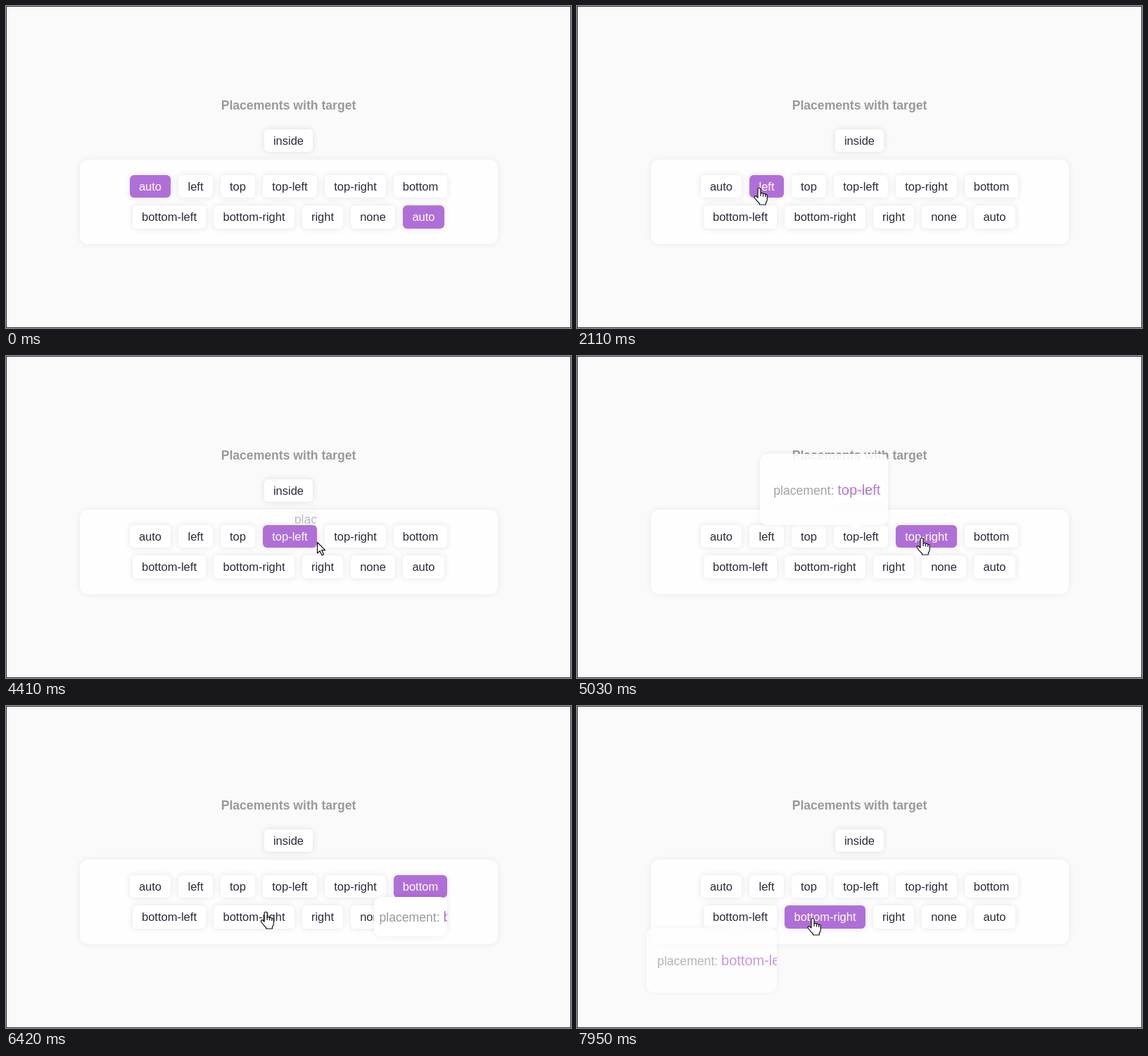
Recreate the animation shown at these times as an HTML page. Size 803x457 px, loop 8 s.

```html
<!DOCTYPE html>
<html lang="en">
<head>
<meta charset="utf-8">
<title>Placements</title>
<style>
  html, body { margin: 0; width: 100%; height: 100%; overflow: hidden; background: #fafafa; }
  body { position: relative; font-family: "Liberation Sans", Arial, sans-serif; }
  body > *, .pop span { position: absolute; box-sizing: border-box; }
  h1 { margin: 0; left: 0; top: 131px; width: 803px; text-align: center; font-size: 17.6px; line-height: 20px; color: #999; }
  .panel { left: 105px; top: 218px; width: 594px; height: 120px; border-radius: 12px; background: #fefefe; box-shadow: 0 0 10px rgba(0,0,0,.07); }
  .btn { border-radius: 6px; background: #fff; color: #2a2a3a; font-size: 16.5px; line-height: 32px; text-align: center; white-space: nowrap; box-shadow: 0 0 10px rgba(0,0,0,.11); }
  .btn.on { background: #b06fd8; color: #fff; }
  .pop { overflow: hidden; border-radius: 10px; background: #fff; box-shadow: 0 0 10px rgba(0,0,0,.08); white-space: nowrap; }
  .pop span { top: 50%; transform: translateY(-50%); font-size: 17.6px; line-height: 24px; color: #999; }
  .pop b { font-weight: normal; font-size: 20px; color: #b06fd8; }
  .tip { width: 20px; height: 10px; background: #fff; }
  .halo { width: 23px; height: 23px; border-radius: 50%; background: rgba(255,255,0,.6); }
  svg { left: 0; top: 0; overflow: visible; }
  .frame { inset: 0; border: 1px solid #30303a; }
</style>
</head>
<body>
<h1>Placements with target</h1>
<div class="panel"></div>
<script>
const LOOP = 8000, CLOSE = 200, WAIT = 300, OPEN = 380, PRESS = 135, HEIGHT = 106;

// label, left, top, width
const buttons = [
  ['inside', 367, 175, 69],
  ['auto', 176, 240, 58], ['left', 245, 240, 49], ['top', 305, 240, 49],
  ['top-left', 365, 240, 77], ['top-right', 453, 240, 87], ['bottom', 551, 240, 76],
  ['bottom-left', 180, 283, 104], ['bottom-right', 295, 283, 115], ['right', 421, 283, 58],
  ['none', 490, 283, 63], ['auto', 564, 283, 59]
].map(([label, x, y, w]) => ({ label, x, y, w, h: y === 283 ? 33 : 32 }));

// button index, click time, anchored on the right, opens below
const clicks = [
  [1, 760, 0, 0], [2, 1905, 1, 0], [3, 2940, 0, 0], [4, 4080, 1, 0],
  [5, 4990, 0, 0], [6, 6010, 1, 1], [7, 6918, 1, 1], [8, 7876, 0, 1]
].map(([index, time, right, below]) => ({ index, time, right, below }));

// time, x, y of the pointer's hot spot
const path = [
  [260, 300, 457], [640, 205, 258], [1090, 205, 258], [1430, 259, 258],
  [2200, 259, 258], [2600, 317, 260], [3400, 317, 260], [3850, 400, 260],
  [4200, 400, 260], [4410, 442, 264], [4650, 490, 258], [5340, 490, 258],
  [5800, 605, 261], [6150, 605, 261], [6610, 232, 310], [7100, 232, 310],
  [7530, 335, 301], [8000, 335, 301]
];

const clamp = v => Math.max(0, Math.min(1, v));
const smooth = v => v * v * (3 - 2 * v);
const easeIn = v => v ** 1.7;
const easeOut = v => 1 - (1 - v) ** 2.2;

function add(className, html = '') {
  const el = document.createElement('div');
  el.className = className;
  el.innerHTML = html;
  document.body.append(el);
  return el;
}

function place(el, x, y, w, h) {
  Object.assign(el.style, { left: x + 'px', top: y + 'px' });
  if (w !== undefined) Object.assign(el.style, { width: w + 'px', height: h + 'px' });
}

for (const b of buttons) {
  b.el = add('btn', b.label);
  place(b.el, b.x, b.y, b.w, b.h);
}

for (const c of clicks) {
  const b = buttons[c.index];
  c.pop = add('pop', `<span>placement: <b>${b.label}</b></span>`);
  c.text = c.pop.firstChild;
  c.width = c.text.offsetWidth + 43;
  c.tip = add('tip');
  c.tip.style.clipPath = c.below ? 'polygon(0 100%, 50% 0, 100% 100%)' : 'polygon(0 0, 100% 0, 50% 100%)';
  place(c.tip, b.x + b.w / 2 + (c.right ? -17 : -3), c.below ? b.y + b.h - 9 : b.y - 1);
}

const halo = add('halo');
document.body.insertAdjacentHTML('beforeend', `
  <svg width="30" height="30" fill="#fff" stroke="#111" stroke-width="1.2" stroke-linejoin="round">
    <path class="arrow" d="M.5 .5V16l3.6-3.4 2.8 6.2 2.6-1.2-2.8-6h5z"/>
    <g class="hand">
      <path d="M-2 1.5Q0-1 2 1.5V8q2-1.5 3.5.5 2-1 3.2 1 2.3-.7 2.6 1.7V17q-.5 3-2 4.5V24H.5V22.5Q-4 18-6.5 14.5-7.5 11.5-5 11.5L-2 14Z"/>
      <path d="M2 8v4M5.5 9v3.5M8.7 10v3" fill="none"/>
    </g>
  </svg>
  <div class="frame"></div>`);
const cursor = document.querySelector('svg');
const arrow = cursor.querySelector('.arrow');
const hand = cursor.querySelector('.hand');
const show = (el, on) => { el.style.display = on ? '' : 'none'; };

function drawPopover(c, next, t) {
  const closing = next && t >= next.time;
  const size = closing
    ? 1 - easeIn(clamp((t - next.time) / CLOSE))
    : easeOut(clamp((t - c.time - WAIT) / OPEN));
  const visible = size > 0 && t > c.time;
  show(c.pop, visible);
  show(c.tip, visible && size > .7);
  if (!visible) return;
  const b = buttons[c.index];
  const w = c.width * size;
  const h = HEIGHT * (closing ? size ** .7 : size);
  place(c.pop, c.right ? b.x + b.w - w : b.x, c.below ? b.y + b.h - 1 : b.y - h, w, h);
  const fade = size ** 1.7;
  c.text.style.left = 21.5 * fade + 'px';
  c.pop.style.opacity = closing ? fade : Math.min(1, .5 + size);
  c.tip.style.opacity = c.pop.style.opacity;
}

function drawCursor(t) {
  show(cursor, t >= path[0][0]);
  const i = Math.max(1, path.findIndex(p => p[0] > t));
  const [t0, x0, y0] = path[i - 1], [t1, x1, y1] = path[i];
  const k = smooth(clamp((t - t0) / (t1 - t0)));
  const x = x0 + (x1 - x0) * k, y = y0 + (y1 - y0) * k;
  const over = buttons.some(b => x >= b.x && x < b.x + b.w && y >= b.y && y < b.y + b.h);
  show(hand, over);
  show(arrow, !over);
  cursor.style.transform = `translate(${x}px, ${y}px)`;
  show(halo, clicks.some(c => t >= c.time - PRESS && t < c.time));
  place(halo, x - 13, y - 12);
}

function draw(t) {
  const current = clicks.filter(c => t >= c.time).pop() || clicks[0];
  buttons.forEach((b, i) => b.el.classList.toggle('on',
    i === current.index || (current === clicks[0] && b.label === 'auto')));
  clicks.forEach((c, i) => drawPopover(c, clicks[i + 1], t));
  drawCursor(t);
}

const start = performance.now();
function tick() {
  draw((performance.now() - start) % LOOP);
  requestAnimationFrame(tick);
}
tick();
</script>
</body>
</html>
```
